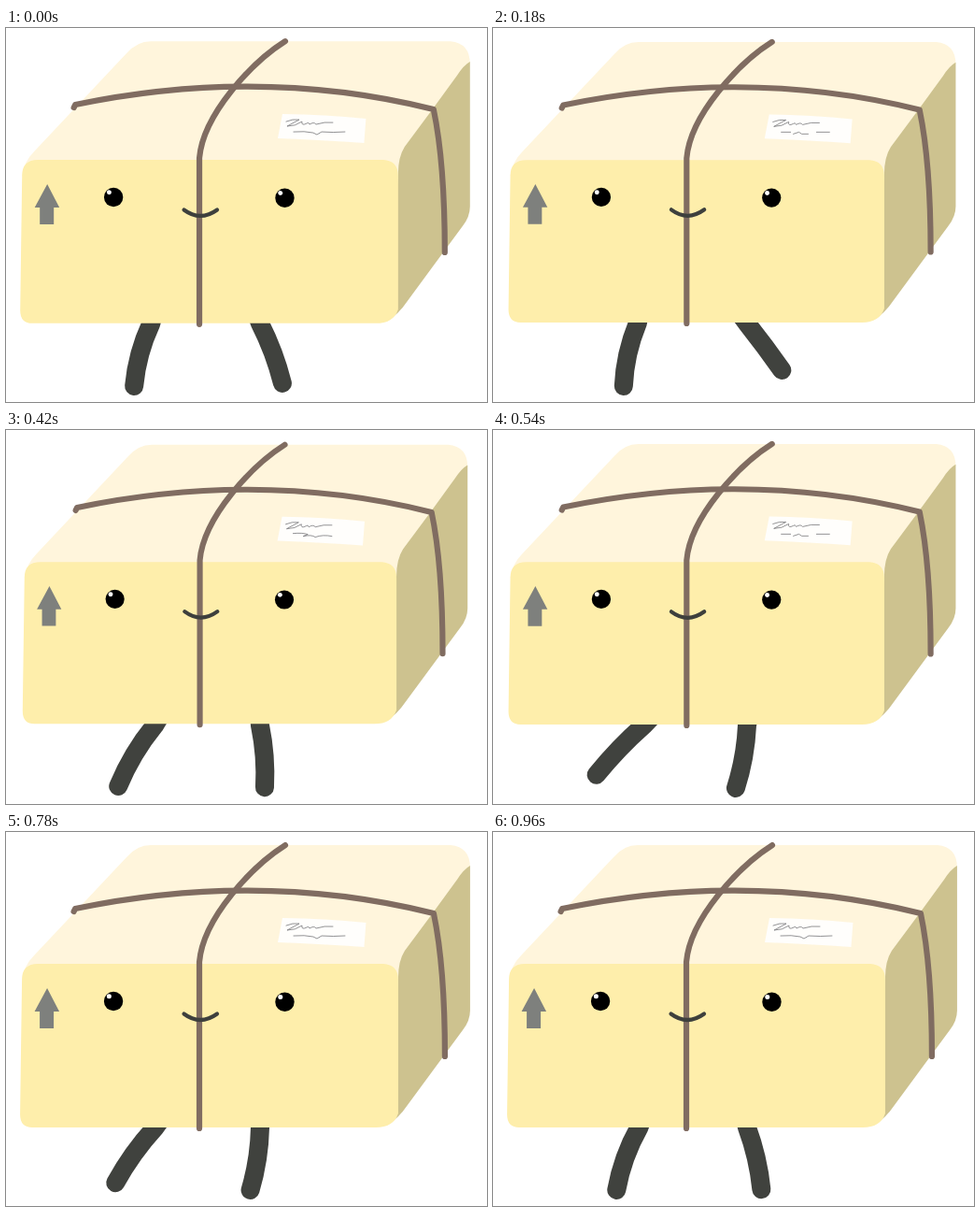
Recreate the animation shown at these times as an HTML page. Size 515 px wide and 400 px high, loop 1020 ms.

```html
<!DOCTYPE html>
<html lang="en">
<head>
<meta charset="utf-8">
<title>Walking parcel</title>
<style>
  html, body { margin: 0; width: 100%; height: 100%; overflow: hidden; background: #fff; }
  svg { display: block; width: 100vw; height: 100vh; }
  .line { fill: none; stroke-linecap: round; stroke-linejoin: round; }
  .leg { stroke: #40423e; stroke-width: 20; }
  .string { stroke: #806c61; stroke-width: 6.2; }
  .ink { stroke: #77777a; stroke-width: .8; }
</style>
</head>
<body>
<svg viewBox="0 0 515 400">
  <path id="left" class="line leg"/>
  <path id="right" class="line leg"/>
  <g id="box">
    <path fill="#fff5dc" d="M17 158Q19 143 30 132L129 27Q140 14 155 14H476Q497 16 497 38L420 160Z"/>
    <path fill="#cdc28f" d="M420 156Q420 138 427 127L456 88L483 51Q490 40 497 36V191Q497 202 489 212L430 292Q420 307 408 313Z"/>
    <path fill="#feeeab" d="M17 158Q17 141 34 141H404Q420 142 420 158V301Q415 316 396 316H28Q15 316 15 302Z"/>
    <path fill="#fffefc" d="M296 92Q341 92.500 385.500 97L383.500 123Q340 120 291 118Z"/>
    <path class="line ink" d="M300 100Q307 97 314 98L301 105Q310 105 317 100Q316 105 322 102Q324 100 325 103Q330 100 332 103Q341 100 350 101"/>
    <g id="notes" class="line ink">
      <path d="M308 111Q320 110 329 112L333 114L338 111Q350 112 363 111"/>
      <path d="M309 111H319M322 113L328 111L331 113H338M347 111H361"/>
      <path d="M308 110Q318 109 324 111L319 113Q328 111 332 114Q340 111 350 113"/>
    </g>
    <path class="line string" d="M299 14C264 36 211 92 207 139V317"/>
    <path class="line string" d="M72.500 85L74 82C200 56 330 55 458 87C466 125 470 180 470 240"/>
    <path fill="#7e807d" d="M44 167L57 192H51V210H36V192H30.500Z"/>
    <g id="eye">
      <circle cx="115" cy="181" r="10.200"/>
      <circle cx="110.300" cy="175.800" r="2.500" fill="#fff"/>
    </g>
    <use href="#eye" x="183.500" y="0.700"/>
    <path class="line" stroke="#3e403d" stroke-width="4.200" d="M190.500 194.500Q208 207.500 226 194.500"/>
  </g>
</svg>
<script>
const STEP = 60, COUNT = 17, FLOOR = 383, BASE = 316;
const $ = id => document.getElementById(id);
const notes = [...$('notes').children];

// swing between 1 and -1: nearly even speed, rounded at the turns
function swing(t, peak) {
  const sharp = .95;
  return Math.asin(sharp * Math.cos((t - peak) / COUNT * 2 * Math.PI)) / Math.asin(sharp);
}

// single soft bump that wraps round the loop
function bump(t, centre, width) {
  const away = Math.abs(t - centre);
  return Math.exp(-((Math.min(away, COUNT - away) / width) ** 2));
}

function leg(id, t, { hip, sway, foot, reach, peak, lift, liftAt, bow }) {
  const wave = swing(t, peak), raised = bump(t, liftAt, 2.3);
  const x0 = hip + sway * wave;
  const dx = foot + reach * wave - x0;
  const dy = FLOOR - lift * raised - BASE;
  const bend = bow * (1 - .8 * raised) / Math.hypot(dx, dy);
  const cx = dx / 2 - dy * bend, cy = dy / 2 + dx * bend;
  // the part above the hip is hidden by the box
  $(id).setAttribute('d', `M${x0 - dx * .3} ${BASE - dy * .3}L${x0} ${BASE}q${cx} ${cy} ${dx} ${dy}`);
}

function draw(t) {
  const squeeze = bump(t, 6, 3.7);
  $('box').setAttribute('transform',
    `translate(256 165) scale(${1 - .0125 * squeeze}) translate(-256 -165)`);
  const shown = Math.round(squeeze * 2);
  notes.forEach((note, i) => note.style.display = i === shown ? '' : 'none');
  leg('left', t, { hip: 158, sway: -4, foot: 125, reach: 18, peak: 1.8, lift: 23, liftAt: 10.6, bow: 6 });
  leg('right', t, { hip: 272, sway: 0, foot: 280, reach: 31, peak: 2.4, lift: 17, liftAt: 3, bow: -4.5 });
}

const start = performance.now();
function tick() {
  draw(Math.floor((performance.now() - start) / STEP) % COUNT);
  requestAnimationFrame(tick);
}
tick();
</script>
</body>
</html>
```
